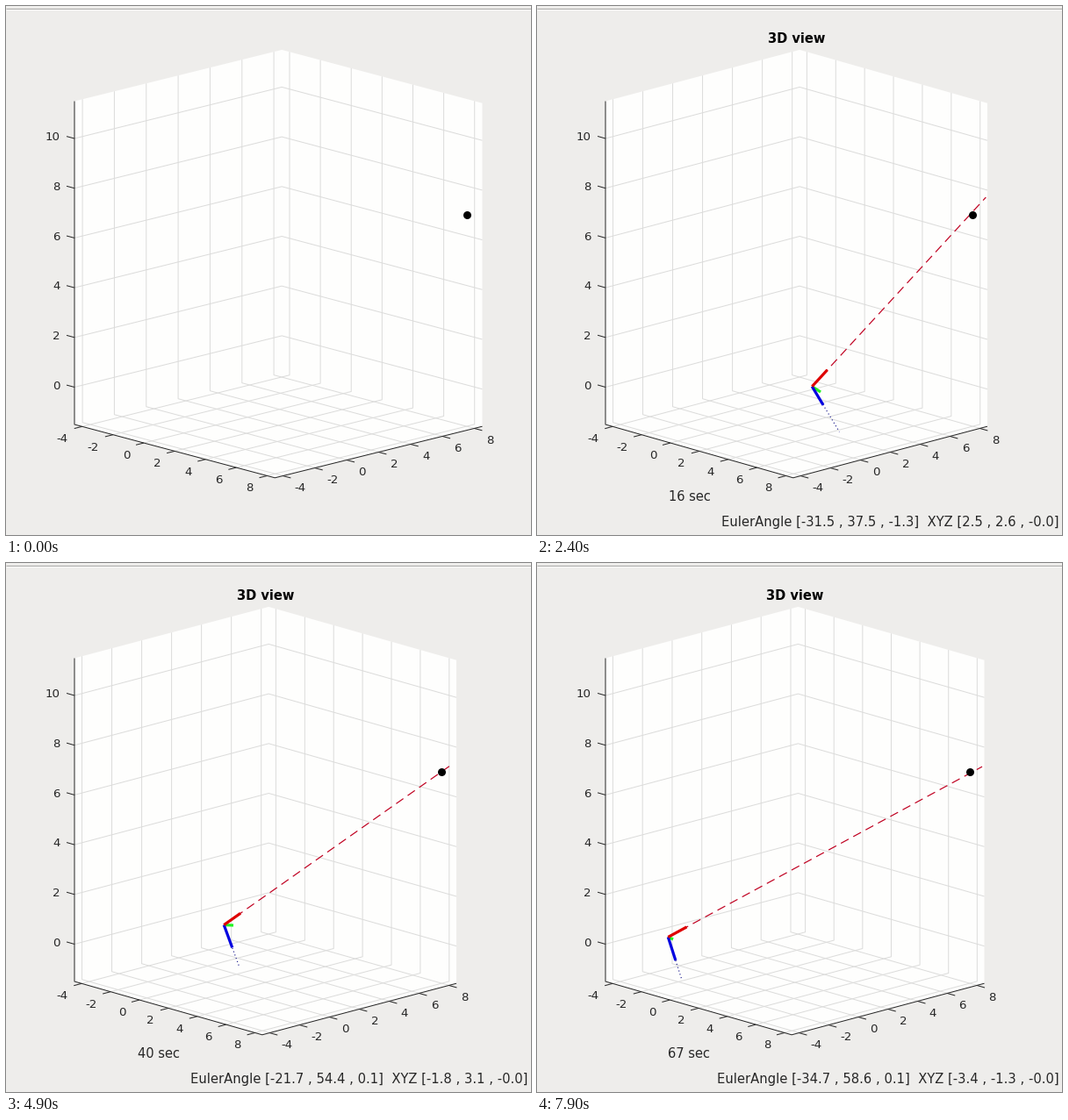
Animation, 598 px wide and 603 px high, one loop 8 s. Source, as a matplotlib script:

```python
import numpy as np
import matplotlib.pyplot as plt
from matplotlib.animation import FuncAnimation
from matplotlib.collections import LineCollection

W, H, DPI = 598, 603, 100
PX = 72 / DPI                      # points per pixel
BACK, PANE, GRID, INK = "#eeedeb", "#fefefd", "#dcdcdb", "#262626"

LO = np.array([-4.5, -4.5, -1.5])
HI = np.array([8.5, 8.5, 11.5])
SPAN = 13
LEFT, BOTTOM = 77.5, 476.5         # pixel position of the left floor corner
X_SHARE, Y_SHARE = 0.4915, 0.5085  # part of the plot width each axis takes
TICKS = range(-4, 9, 2)
GOAL = np.array([8, 8, 7])
RADIUS = 3.59

# orbit angle in degrees over time in seconds
ORBIT_T = [0, 9, 25, 33, 47, 58, 67, 70]
ORBIT_DEG = [-1.9, 25.4, 74.2, 98.6, 140.6, 173.8, 200.8, 209.8]

# reported attitude over time: the tracker settles on the goal, then lags a bit
EULER_T = [0, 3, 6, 9, 14, 19, 25, 33, 47, 58, 67]
EULER = np.array([
    (0, 0, 0), (-28, 20, -2), (-39, 27.5, -4.5), (-40, 31.2, -4.4),
    (-33.6, 35.8, -1.8), (-28.4, 40.1, -0.5), (-24.2, 44.9, -0.1),
    (-21.5, 50.6, 0.1), (-23.7, 57.1, 0.1), (-29.2, 59, 0.1),
    (-34.7, 58.6, 0.1)])

PAUSES = (12, 44, 52, 55, 70)      # the clock waits for one step
REPEATS = (29, 32, 61, 63, 67, 75) # the picture waits, the clock runs on


def position(t):
    a = np.radians(np.interp(t, ORBIT_T, ORBIT_DEG))
    return np.array([RADIUS * np.cos(a), RADIUS * np.sin(a), 0])


def aim(t):
    d = GOAL - position(t)
    return np.degrees([-np.arcsin(d[1] / np.linalg.norm(d)),
                       np.arctan2(d[0], d[2]), 0])


ERROR = EULER - np.array([aim(t) for t in EULER_T])


def attitude(t):
    return aim(t) + [np.interp(t, EULER_T, ERROR[:, k]) for k in range(3)]


def rotation(angles):
    (ca, cb, cc), (sa, sb, sc) = np.cos(np.radians(angles)), np.sin(np.radians(angles))
    rx = np.array([[1, 0, 0], [0, ca, -sa], [0, sa, ca]])
    ry = np.array([[cb, 0, sb], [0, 1, 0], [-sb, 0, cb]])
    rz = np.array([[cc, -sc, 0], [sc, cc, 0], [0, 0, 1]])
    return ry @ rx @ rz


def to_wall(p, d):
    """End of the ray from p along d at the side of the plot box."""
    reach = [((HI if d[k] > 0 else LO)[k] - p[k]) / d[k]
             for k in range(3) if abs(d[k]) > 1e-6]
    return p + d * min(reach)


def clock(i):
    if i < 8:
        return -1
    if i in REPEATS:
        i -= 1
    return i - 7 - sum(i >= p for p in PAUSES)


def readout(t):
    a, b, c = attitude(t)
    x, y, _ = position(t)
    z = 0.001 if t < 16 else -0.001
    return (f"EulerAngle [{a:.1f} , {b:.1f} , {c:.1f}]"
            f"  XYZ [{x:.1f} , {y:.1f} , {z:.1f}]")


fig = plt.figure(figsize=(W / DPI, H / DPI), dpi=DPI, facecolor=BACK)
ax = fig.add_axes([0, 0, 1, 1])


def label(x, y, s, ha, size=13.33, **kw):
    return ax.text(x, y, s, ha=ha, va="baseline", fontsize=size * PX,
                   family="DejaVu Sans", **{"color": INK, **kw})


def segments(lines, color, width=1, z=2):
    ax.add_collection(LineCollection(lines, colors=color, linewidths=width * PX,
                                     zorder=z, capstyle="butt"), autolim=False)


def draw_box(proj):
    x0, y0, z0 = LO
    x1, y1, z1 = HI
    outline = [(x0, y0, z0), (x1, y0, z0), (x1, y1, z0),
               (x1, y1, z1), (x0, y1, z1), (x0, y0, z1)]
    ax.fill(*zip(*[proj(p) for p in outline]), color=PANE, lw=0, zorder=1)

    grid = []
    for v in TICKS:
        grid += [[(v, y0, z0), (v, y1, z0), (v, y1, z1)],
                 [(x1, v, z0), (x0, v, z0), (x0, v, z1)]]
    for v in range(0, 11, 2):
        grid.append([(x0, y0, v), (x0, y1, v), (x1, y1, v)])
    segments([[proj(p) for p in g] for g in grid], GRID)

    corner, front, right = proj(outline[0]), proj(outline[1]), proj(outline[2])
    out_y, out_x = corner - proj((x0, y1, z0)), front - corner
    out_y, out_x = (9.3 * d / np.hypot(*d) for d in (out_y, out_x))
    ink = [[proj(outline[5]), corner, front, right]]
    for v in TICKS:
        p, q = proj((v, y0, z0)), proj((x1, v, z0))
        ink += [[p, p + out_y], [q, q + out_x]]
        label(p[0] - 15.8, p[1] + 18, v, "right")
        label(q[0] + 13.3, q[1] + 17.3, v, "left")
    for v in range(0, 11, 2):
        p = proj((x0, y0, v))
        ink.append([p, p - out_x])
        label(61.5, p[1] + 2.3, v, "right")
    segments(ink, INK, z=3)


def draw_body(proj, t):
    p = position(t)
    blue, green, red = rotation(attitude(t)).T
    for d, color, dash in ((red, "#c00020", (10, 6)), (blue, "#14148a", (1.1, 2.9))):
        ends = np.array([proj(p), proj(to_wall(p, d))])
        ax.plot(*ends.T, color=color, lw=1.2 * PX, zorder=4, dash_capstyle="butt",
                linestyle=(0, tuple(n / 1.2 for n in dash)))
    for d, color in ((green, "#22f422"), (blue, "#0000e0"), (red, "#de0000")):
        segments([[proj(p), proj(p + d)]], color, 3.2, z=6)


def draw(i):
    ax.clear()
    ax.set_axis_off()
    ax.set(xlim=(-0.5, W - 0.5), ylim=(H - 0.5, -0.5))
    segments([[(-1, 2), (W, 2)]], "#a9a8a6")
    segments([[(-1, 3), (W, 3)]], "#fbfbfa")

    t = clock(i)
    width = 464.5
    if t >= 0:
        # the plot shrinks so that the centred readout still fits
        text = label(593.7, 593, readout(t), "right", 14.7)
        width = (516.5 - text.get_window_extent().width / 2) / 0.7455
        label(LEFT + width / 2, 42, "3D view", "center", 14.67,
              weight="bold", color="black")
        label(LEFT + 0.2755 * width, 563, f"{t} sec", "right", 14.67)

    def proj(p):
        u, v, w = (np.asarray(p) - LO) / SPAN
        return np.array([LEFT + width * (X_SHARE * u + Y_SHARE * v),
                         BOTTOM + 60.8 * u - 58.6 * v - 368.5 * w])

    draw_box(proj)
    ax.plot(*proj(GOAL), "o", color="black", ms=9 * PX, mew=0, zorder=5)
    if i >= 6:
        draw_body(proj, t + 1)


anim = FuncAnimation(fig, draw, frames=80, interval=100, repeat=True,
                     repeat_delay=0)
plt.show()
```
